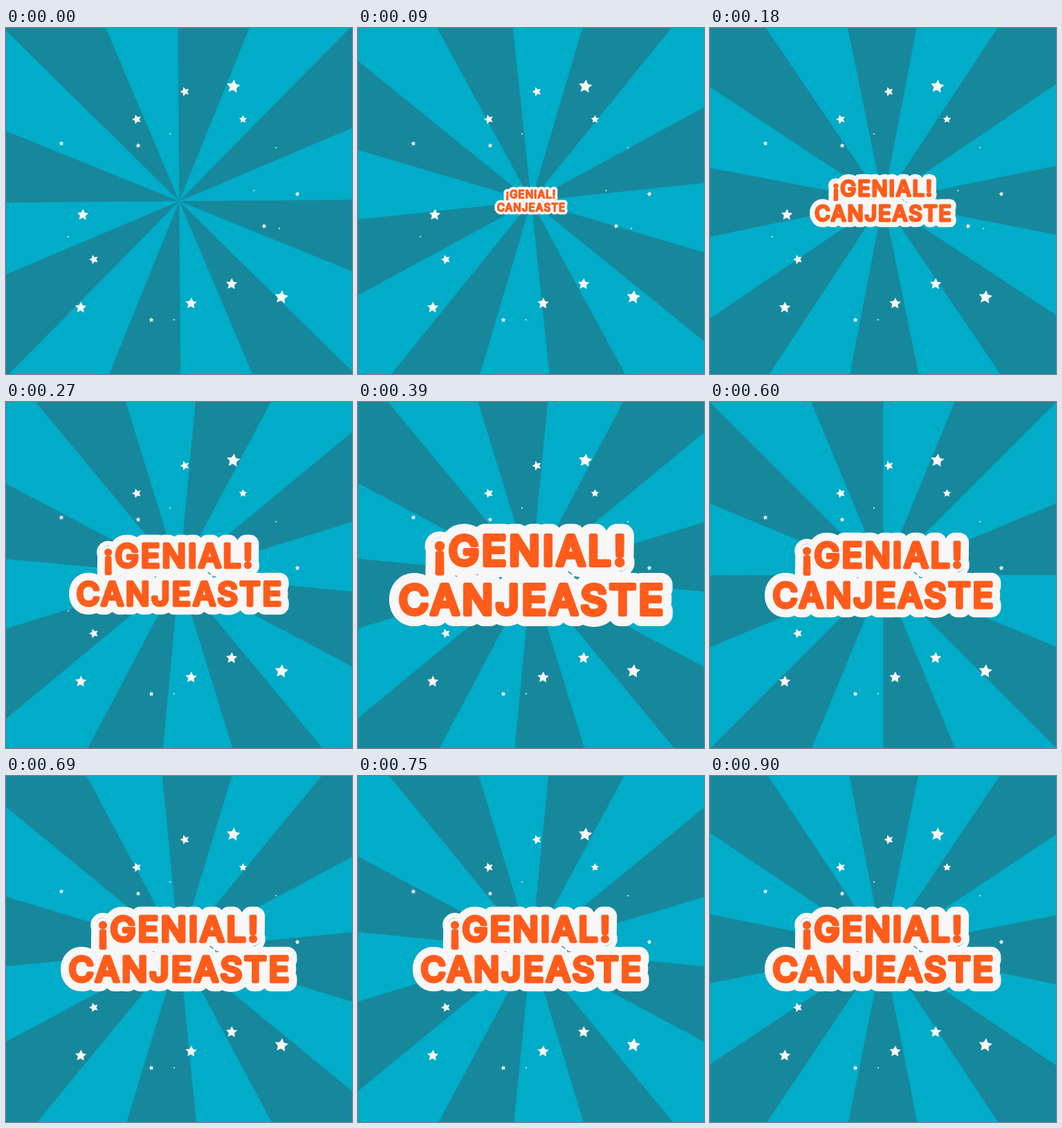
Animation of 500 by 500 pixels, one loop 0.93 s. Source, as an HTML page:

```html
<!DOCTYPE html>
<html lang="es">
<head>
<meta charset="utf-8">
<title>¡Genial!</title>
<style>
  html, body { margin: 0; width: 100%; height: 100%; overflow: hidden; background: #00acc8; }
  svg { display: block; width: 100vw; height: 100vh; }
  text { font: 500 49.5px Inter, "Open Sans", sans-serif; letter-spacing: 3px; text-anchor: middle; }
  #title { stroke-linejoin: round; stroke-linecap: round; }
  .outline { fill: #f7f7f7; stroke: #f7f7f7; stroke-width: 28.5; }
  .inner { stroke-width: 14; }
  .face { fill: #ff5c1c; stroke: #ff5c1c; stroke-width: 5; }
</style>
</head>
<body>
<svg viewBox="0 0 500 500">
  <defs>
    <g id="words">
      <text x="250" y="238.5">¡GENIAL!</text>
      <text x="251.5" y="297.3">CANJEASTE</text>
    </g>
  </defs>
  <path id="rays" fill="#17889c"/>
  <path id="stars" fill="#f7f7f7"/>
  <g id="title">
    <use href="#words" class="outline"/>
    <use href="#words" class="outline inner"/>
    <path d="M295 246l4 3M302.5 252l1 2" stroke="#17889c" stroke-width="1.3"/>
    <use href="#words" class="face"/>
  </g>
</svg>
<script>
const LOOP = 930, STEP = 30, RAYS = 8, TURN = 175;
const [rays, stars, title] = ['rays', 'stars', 'title'].map(id => document.getElementById(id));

// Point at a clockwise angle (degrees) from straight up
const polar = (r, deg, x = 0, y = 0) => {
  const a = deg * Math.PI / 180;
  return `${(x + r * Math.sin(a)).toFixed(2)},${(y - r * Math.cos(a)).toFixed(2)}`;
};

const wedge = (_, i) => {
  const a = i * 360 / RAYS;
  return `M0,0L${polar(500, a)}L${polar(500, a + 180 / RAYS)}Z`;
};

const star = (x, y, r, tilt) => 'M' + Array.from({ length: 10 }, (_, i) =>
  polar(i % 2 ? r / 2 : r, tilt + i * 36, x, y)).join('L') + 'Z';

// Stars sharing a size and tilt
const cluster = (r, tilt, ...spots) => spots.map(([x, y]) => star(x, y, r, tilt)).join('');

rays.setAttribute('d', Array.from({ length: RAYS }, wedge).join(''));
stars.setAttribute('d',
  cluster(10.2, 7, [328.5, 84.5], [398, 389]) +
  cluster(8.6, 3, [111, 270], [108, 404], [267.5, 398], [326, 370]) +
  cluster(7, -18, [258.5, 92], [189, 132], [127, 334.5]) +
  cluster(6, 0, [342.5, 132]) +
  cluster(3.7, -10, [191, 170], [80, 167], [421, 240], [373, 286.5], [210, 422]) +
  cluster(1.4, 0, [237, 153], [390, 173], [358.5, 235], [395, 289.5], [90, 301.5], [243, 421.5]));

// Grow past full size, then settle
const PEAK = 1.24, GROW = 360, SETTLE = 180;
const titleScale = t => t < GROW
  ? PEAK * t / GROW
  : Math.max(1, PEAK - (PEAK - 1) * (t - GROW) / SETTLE);

function draw(now) {
  const t = Math.floor(now % LOOP / STEP) * STEP;
  rays.setAttribute('transform', `translate(250.3 250.3) rotate(${TURN * t / LOOP - 0.45})`);
  title.setAttribute('transform', `translate(250 250) scale(${titleScale(t)}) translate(-250 -250)`);
  title.setAttribute('visibility', t ? 'visible' : 'hidden');
}

const start = performance.now();
function tick() {
  draw(performance.now() - start);
  requestAnimationFrame(tick);
}
tick();
</script>
</body>
</html>
```
